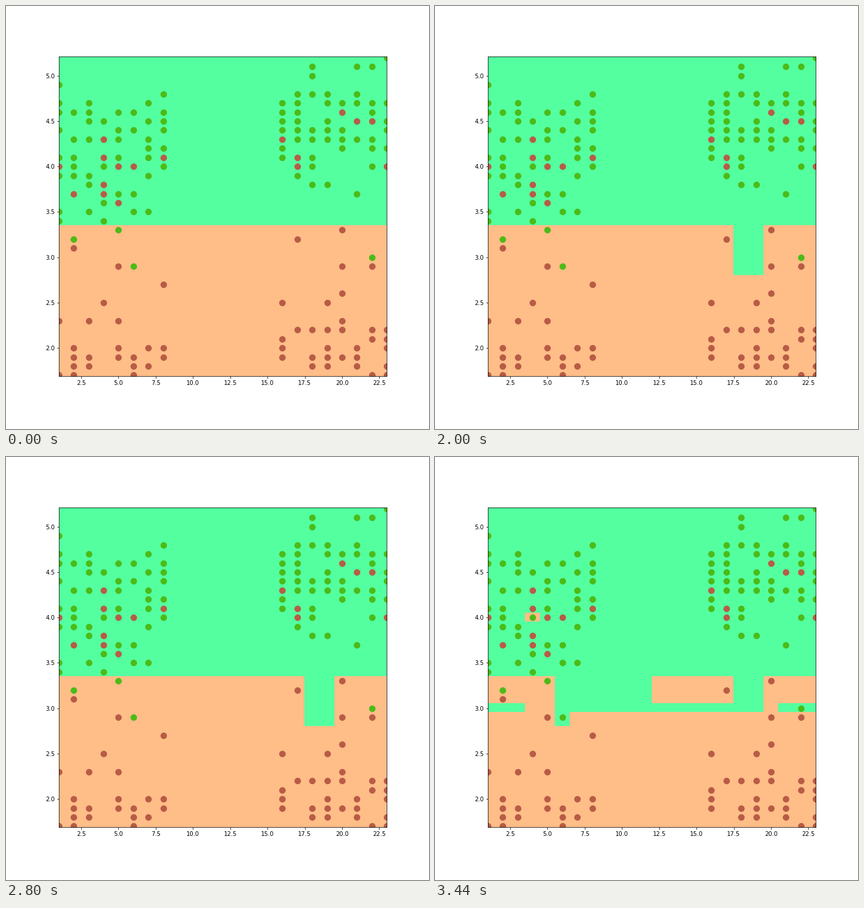
These frames come from a looping animation (720x720 px, 3.6 s). A matplotlib script:

```python
import matplotlib.pyplot as plt
import numpy as np
from matplotlib.animation import FuncAnimation
from matplotlib.patches import Rectangle

GREEN_AREA, ORANGE_AREA = "#54ff9f", "#ffbd88"
GREEN_DOT, RED_DOT = "#4cbb17", "#b85c45"
X0, X1, Y0, Y1 = 1, 23, 1.69, 5.21
STEP = 400
HOLD = 5  # ticks spent on the first stage

# Observations per hour, in tenths
GREEN = {
    1: (49, 47, 46, 44, 41, 39, 35, 34),
    2: (46, 43, 41, 40, 39, 32),
    3: (47, 46, 45, 43, 39, 38, 35),
    4: (45, 40, 36, 34),
    5: (46, 44, 43, 41, 37, 33),
    6: (46, 44, 37, 35, 29),
    7: (47, 45, 43, 42, 41, 39, 35),
    8: (48, 46, 45, 44, 42, 40),
    16: (47, 46, 45, 44, 42, 41),
    17: (48, 47, 46, 45, 44, 43, 39),
    18: (51, 50, 48, 44, 43, 41, 40, 38),
    19: (48, 47, 45, 44, 43, 38),
    20: (47, 44, 43, 42),
    21: (51, 48, 47, 43, 37),
    22: (51, 47, 46, 43, 42, 40, 30),
    23: (52, 47, 45, 44, 42),
}
RED = {
    1: (40, 23, 17),
    2: (37, 31, 20, 19, 18, 17),
    3: (23, 19, 18),
    4: (43, 41, 38, 37, 25),
    5: (40, 36, 29, 23, 20, 19),
    6: (40, 19, 18, 17),
    7: (20, 18),
    8: (41, 27, 20, 19),
    16: (43, 25, 21, 20, 19),
    17: (41, 40, 32, 22),
    18: (22, 19, 18),
    19: (25, 22, 20, 19, 18),
    20: (46, 33, 29, 26, 23, 22, 19),
    21: (45, 20, 19, 18),
    22: (45, 29, 22, 21, 17),
    23: (40, 22, 21, 20, 18, 17),
}

# Decision regions of each stage: x range, y range, colour, painted in order
BASE = (X0, X1, Y0, 3.35, ORANGE_AREA)
NOTCH = (17.5, 19.5, 2.8, 3.35, GREEN_AREA)
LEFT = (X0, 3.5, 2.8, 3.35, GREEN_AREA)
DEEP = [
    (X0, X1, Y0, 2.95, ORANGE_AREA),
    (5.5, 6.5, 2.8, 2.95, GREEN_AREA),
    (X0, 5.5, 2.95, 3.35, ORANGE_AREA),
    (X0, 3.5, 2.95, 3.05, GREEN_AREA),
    (12, 17.5, 3.05, 3.35, ORANGE_AREA),
    (19.5, X1, 2.95, 3.35, ORANGE_AREA),
    (20.5, X1, 2.95, 3.05, GREEN_AREA),
    (3.5, 4.5, 3.95, 4.05, ORANGE_AREA),
]
STAGES = [[BASE], [BASE, NOTCH], [BASE, NOTCH, LEFT], [BASE, NOTCH], DEEP]

fig = plt.figure(figsize=(10, 10), dpi=72, facecolor="white")
ax = fig.add_axes([0.125, 0.125, 0.775, 0.755], facecolor=GREEN_AREA)
ax.set(xlim=(X0, X1), ylim=(Y0, Y1),
       xticks=np.arange(2.5, 23, 2.5), yticks=np.arange(2, 5.1, 0.5))


def grid_x(x):
    return x if x in (X0, X1) else x - 0.005


def grid_y(y):
    return y if y == Y0 else y + 0.006


def region(x0, x1, y0, y1, color):
    x0, x1 = grid_x(x0), grid_x(x1)
    y0, y1 = grid_y(y0), grid_y(y1)
    return ax.add_patch(Rectangle((x0, y0), x1 - x0, y1 - y0, color=color,
                                  lw=0, antialiased=False, zorder=0.5))


def dots(data, color):
    points = [(x, y / 10) for x, ys in data.items() for y in ys]
    ax.scatter(*zip(*points), s=100, color=color, zorder=2)


dots(GREEN, GREEN_DOT)
dots(RED, RED_DOT)
layers = [[region(*r) for r in stage] for stage in STAGES]


def update(tick):
    current = max(0, tick - HOLD + 1)
    for i, layer in enumerate(layers):
        for patch in layer:
            patch.set_visible(i == current)
    return [patch for layer in layers for patch in layer]


anim = FuncAnimation(fig, update, frames=HOLD + len(STAGES) - 1,
                     interval=STEP, repeat=True, repeat_delay=0)
plt.show()
```
